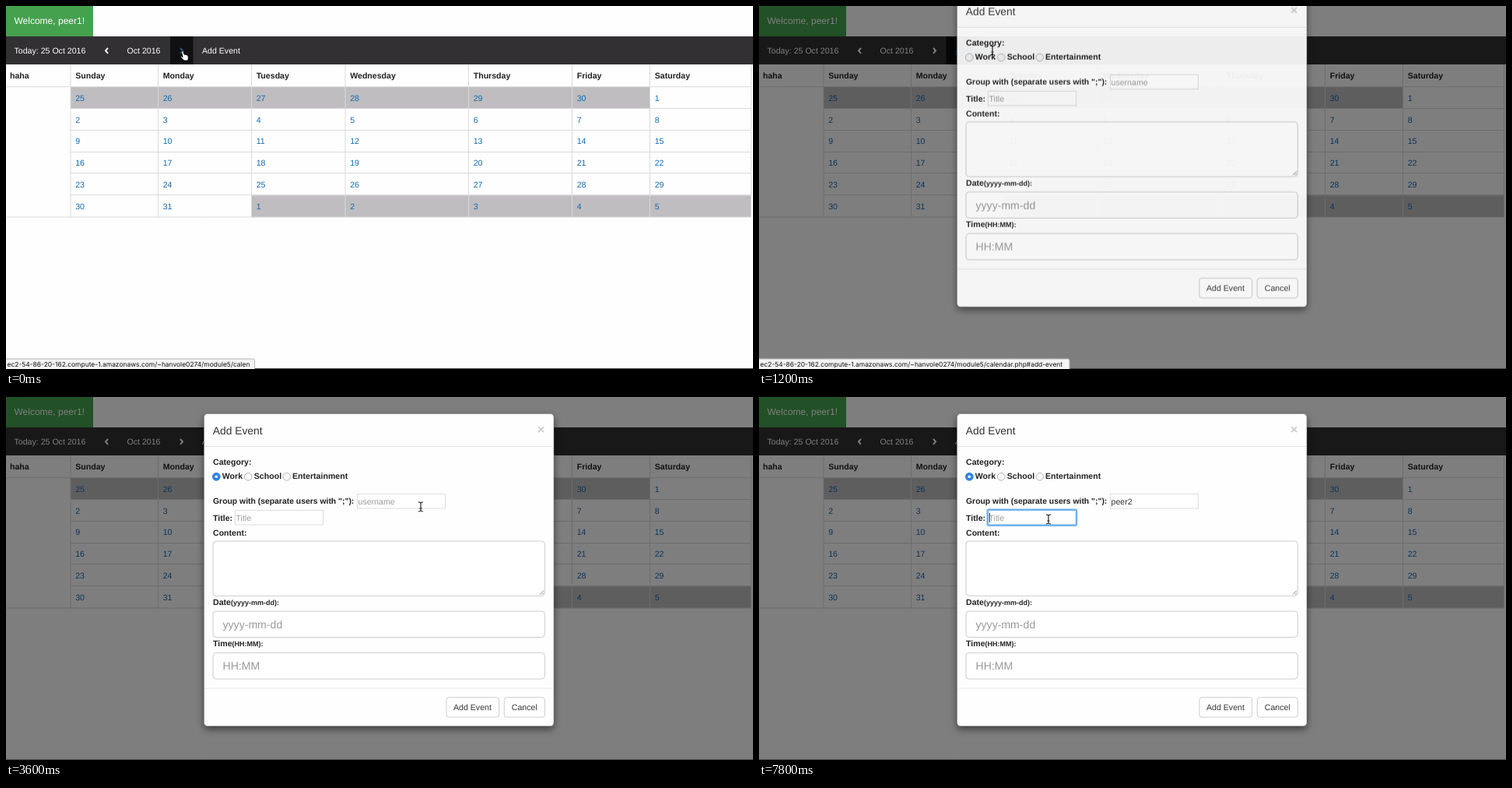
Write an HTML page that moves like this. It is 960 px wide and 466 px high and loops after 8 s.

```html
<!DOCTYPE html>
<html lang="en">
<head>
<meta charset="utf-8">
<title>Calendar: add an event</title>
<style>
html, body { margin: 0; width: 100%; height: 100%; overflow: hidden; background: #fff; }
svg { display: block; width: 960px; height: 466px; }
text { font: 10.6px "Liberation Sans", Arial, sans-serif; fill: #333; text-rendering: geometricPrecision; white-space: pre; }
.bold text, text.bold { font-weight: bold; fill: #222; }
.nav text { fill: #fff; }
.nav .welcome { font-size: 12px; }
.link { fill: #1469b5; }
.grid { stroke: #dadada; fill: none; }
.chevron { fill: none; stroke: #fff; stroke-width: 2; }
.status text { font: 8.45px Inter, sans-serif; fill: #111; }
.status rect { fill: #f4f4f4; stroke: #b5b5b5; }
.field { fill: #fff; stroke: #ccc; }
.plain { fill: #fff; stroke: #ddd; }
.hint { fill: #999; }
.big { font-size: 14.1px; }
.title { font-size: 13.8px; }
.small { font-size: 9px; }
.ring { fill: none; stroke: #6fb2f3; stroke-width: 2.4; }
.caret { stroke: #222; }
.shadow { filter: drop-shadow(0 4px 5px rgba(0, 0, 0, .5)); }

/* One loop is 8 s, so 2.5% is one 200 ms step. */
.a { animation: 8s step-end infinite; }
.next-on { animation-name: next-on; }
.next-off { animation-name: next-off; }
.add-hover { animation-name: add-hover; }
.add-bar { animation-name: add-bar; }
.add-link { animation-name: add-link; }
.backdrop { animation-name: backdrop; }
.modal { animation-name: modal; }
.picked { animation-name: picked; }
.empty { animation-name: empty; }
.typed { animation-name: typed; }
.user-focus { animation-name: user-focus; }
.title-focus { animation-name: title-focus; }
.advance { animation-name: advance; }
.cursor { animation-name: move; }
.hand { animation-name: hand; }
.arrow { animation-name: arrow; }
.beam { animation-name: beam; }

@keyframes next-on { 0% { opacity: 1 } 5%, 100% { opacity: 0 } }
@keyframes next-off { 0% { opacity: 0 } 5%, 100% { opacity: 1 } }
@keyframes add-hover { 0% { opacity: 0 } 5% { opacity: 1 } 20%, 100% { opacity: 0 } }
@keyframes add-bar { 0% { opacity: 0 } 5% { opacity: 1 } 22.5%, 100% { opacity: 0 } }
@keyframes add-link {
  0% { fill: #fff; text-decoration: none }
  5% { fill: #23618f; text-decoration: underline }
  35%, 100% { fill: #fff; text-decoration: none }
}
@keyframes backdrop { 0% { opacity: 0 } 12.5% { opacity: .34 } 15%, 100% { opacity: .5 } }
@keyframes modal {
  0% { opacity: 0; transform: translateY(-100px) }
  15% { opacity: .93; transform: translateY(-36.3px) }
  17.5%, 100% { opacity: 1; transform: none }
}
@keyframes picked { 0% { opacity: 0 } 35%, 100% { opacity: 1 } }
@keyframes empty { 0% { opacity: 1 } 55%, 100% { opacity: 0 } }
@keyframes typed { 0% { opacity: 0 } 55%, 100% { opacity: 1 } }
@keyframes user-focus { 0% { opacity: 0 } 50% { opacity: 1 } 90%, 100% { opacity: 0 } }
@keyframes title-focus { 0% { opacity: 0 } 90%, 100% { opacity: 1 } }
@keyframes advance {
  0% { transform: translateX(0) }
  55% { transform: translateX(5.9px) }
  57.5% { transform: translateX(11.8px) }
  60% { transform: translateX(17.7px) }
  62.5% { transform: translateX(21.2px) }
  67.5%, 100% { transform: translateX(27.2px) }
}
@keyframes move {
  0% { transform: translate(227px, 58px) }
  2.5% { transform: translate(227px, 58px); animation-timing-function: steps(2) }
  7.5% { transform: translate(298px, 58px) }
  10% { transform: translate(299px, 56px) }
  15% { transform: translate(300px, 57px) }
  17.5% { transform: translate(300px, 57px); animation-timing-function: steps(3) }
  25% { transform: translate(357px, 314px); animation-timing-function: steps(4) }
  35% { transform: translate(270px, 101px) }
  37.5% { transform: translate(270px, 101px); animation-timing-function: steps(3) }
  45% { transform: translate(533px, 141px) }
  47.5% { transform: translate(533px, 137px) }
  72.5% { transform: translate(505px, 128px) }
  75% { transform: translate(484px, 117px); animation-timing-function: steps(5) }
  87.5%, 100% { transform: translate(372px, 157px) }
}
@keyframes hand { 0% { opacity: 1 } 10%, 100% { opacity: 0 } }
@keyframes arrow {
  0%, 15%, 42.5%, 85%, 100% { opacity: 0 }
  10%, 20%, 72.5% { opacity: 1 }
}
@keyframes beam {
  0%, 20%, 55% { opacity: 0 }
  15%, 42.5%, 85%, 100% { opacity: 1 }
}
</style>
</head>
<body>
<svg viewBox="0 0 960 466">
  <rect width="960" height="466" fill="#fefefe"/>
  <g class="nav">
    <rect width="112" height="39" fill="#45a14e"/>
    <text class="welcome" x="10.5" y="23">Welcome, peer1!</text>
    <rect y="39" width="960" height="36" fill="#323032"/>
    <rect class="a next-on" x="211" y="39" width="29.5" height="36" fill="#100f11"/>
    <rect class="a add-hover" x="240.5" y="39" width="72.5" height="36" fill="#0d0c0e"/>
    <text x="10.5" y="61">Today: 25 Oct 2016</text>
    <text x="155.5" y="61">Oct 2016</text>
    <text class="a add-link" x="252" y="61">Add Event</text>
    <path class="chevron" d="M131 53.8l-3 3.5l3 3.5"/>
    <path class="chevron a next-off" d="M224 53.8l3 3.5l-3 3.5"/>
    <path class="chevron a next-on" d="M224 53.8l3 3.5l-3 3.5" style="stroke:#24578a"/>
  </g>
  <g id="calendar"></g>
  <rect class="a backdrop" width="960" height="466"/>

  <g class="a modal">
    <rect class="shadow" x="254.5" y="21.5" width="449.5" height="401" rx="4.5" fill="#fefefe" stroke="#777" stroke-opacity=".5"/>
    <path d="M255 63.5H704M255 374H704" stroke="#e5e5e5"/>
    <text class="title" x="265.8" y="47.5">Add Event</text>
    <text x="683" y="46.5" style="font-size:16px;font-weight:bold;fill:#ccc">×</text>
    <g class="bold">
      <text x="266" y="86.5">Category:</text>
      <text x="277.8" y="105">Work</text>
      <text x="318.8" y="105">School</text>
      <text x="368" y="105">Entertainment</text>
      <text x="266" y="137.3" style="font-size:10.4px">Group with (separate users with ";"):</text>
      <text x="266" y="158.5">Title:</text>
      <text x="266" y="177.5">Content:</text>
      <text x="266" y="267.3">Date<tspan class="small">(yyyy-mm-dd):</tspan></text>
      <text x="266" y="320.3">Time<tspan class="small">(HH:MM):</tspan></text>
    </g>
    <g fill="#fafafa" stroke="#b5b5b5">
      <circle cx="270.3" cy="102.3" r="4.8"/>
      <circle cx="311.2" cy="102.3" r="4.8"/>
      <circle cx="360.8" cy="102.3" r="4.8"/>
    </g>
    <g class="a picked">
      <circle cx="270.3" cy="102.3" r="5.2" fill="#2b84ec"/>
      <circle cx="270.3" cy="102.3" r="1.8" fill="#fff"/>
    </g>

    <rect class="plain" x="451.5" y="124.5" width="113" height="18.5"/>
    <text class="hint a empty" x="452.5" y="137.5">username</text>
    <g class="a typed">
      <text x="452.5" y="137.5">peer2</text>
      <rect class="a advance" x="452.5" y="126" width="60" height="15" fill="#fff"/>
    </g>
    <g class="a user-focus">
      <rect class="ring" x="450.7" y="123.7" width="114.3" height="20" rx="1.5"/>
      <path class="caret a advance" d="M452.8 128V140"/>
    </g>

    <rect class="plain" x="294.5" y="145.5" width="113" height="18.5"/>
    <text class="hint" x="295.5" y="158.5">Title</text>
    <g class="a title-focus">
      <rect class="ring" x="293.7" y="144.7" width="114.3" height="20" rx="1.5"/>
      <path class="caret" d="M296.3 149V161"/>
    </g>

    <rect class="field" x="266" y="185" width="426.3" height="70.3" rx="4"/>
    <path d="M686 253.5l5-5M689 253.5l2-2" stroke="#777" stroke-width=".9"/>
    <rect class="field" x="266" y="275" width="426.3" height="33.5" rx="4"/>
    <text class="hint big" x="278.5" y="296.5">yyyy-mm-dd</text>
    <rect class="field" x="266" y="328.3" width="426.3" height="33.7" rx="4"/>
    <text class="hint big" x="278.5" y="349.8">HH:MM</text>
    <rect class="field" x="566" y="385.7" width="67.7" height="25.3" rx="3"/>
    <text x="575" y="402">Add Event</text>
    <rect class="field" x="640.3" y="385.7" width="52" height="25.3" rx="3"/>
    <text x="649.8" y="402">Cancel</text>
  </g>

  <path d="M0 465.5H960" stroke="#4a464a"/>
  <clipPath id="short"><rect y="452" width="320" height="14"/></clipPath>
  <g class="status a next-on" clip-path="url(#short)">
    <rect x="-2" y="453" width="321.5" height="15" rx="2"/>
    <text x="1.5" y="462.5">ec2-54-86-20-162.compute-1.amazonaws.com/~hanvole0274/module5/calen</text>
  </g>
  <g class="status a add-bar">
    <rect x="-2" y="453" width="401" height="15" rx="2"/>
    <text x="1.5" y="462.5">ec2-54-86-20-162.compute-1.amazonaws.com/~hanvole0274/module5/calendar.php#add-event</text>
  </g>

  <g class="a cursor">
    <path class="a hand" d="M-1 0q1.5-1 2 .5l1 3.8q1-.8 1.8.3q1-.6 1.7.5q1.2-.3 1.5 1l.4 3l-.7 3H1.7l-4-4.2q-.8-1.5.8-1.3l1.6 1.1L-1.3 1.2z" fill="#fff" stroke="#000" stroke-width=".9"/>
    <path class="a arrow" d="M0 0V11.5l2.6-2.4l1.8 4l2-.9l-1.8-3.9H8z" fill="#000" stroke="#fff" stroke-width=".9"/>
    <path class="a beam" d="M-3-6q2.2 0 3 1.2q.8-1.2 3-1.2M0-5V5M-3 6q2.2 0 3-1.2q.8 1.2 3 1.2M-1.5 2H1.5" fill="none" stroke="#111" stroke-width="1.1"/>
  </g>
</svg>
<script>
const columns = [83, 195.5, 315.5, 436, 594.5, 727.5, 827.5, 957.5];
const days = ["Sunday", "Monday", "Tuesday", "Wednesday", "Thursday", "Friday", "Saturday"];
const rowTop = row => 104 + row * 27.85;
const label = (x, y, value, kind) => `<text class="${kind}" x="${x}" y="${y}">${value}</text>`;
const shade = (from, to, row) =>
  `<rect x="${columns[from]}" y="${rowTop(row)}" width="${columns[to] - columns[from]}" height="27.85" fill="#bfbdbf"/>`;

let lines = "M0 103.7H957.5M0 271H957.5";
for (let row = 1; row < 6; row++) lines += `M83 ${Math.round(rowTop(row)) - .5}H957.5`;
for (const x of columns) lines += `M${x} 75V271`;

let markup = shade(0, 6, 0) + shade(2, 7, 5) + `<path class="grid" d="${lines}"/>` + label(5, 93.3, "haha", "bold");
days.forEach((day, col) => {
  const x = columns[col] + 6.2;
  markup += label(x, 93.3, day, "bold");
  for (let row = 0; row < 6; row++) {
    const n = row * 7 + col - 5;
    const date = n < 1 ? n + 30 : n > 31 ? n - 31 : n;
    markup += label(x, rowTop(row) + 17.7, date, "link");
  }
});
document.getElementById("calendar").innerHTML = markup;
</script>
</body>
</html>
```
